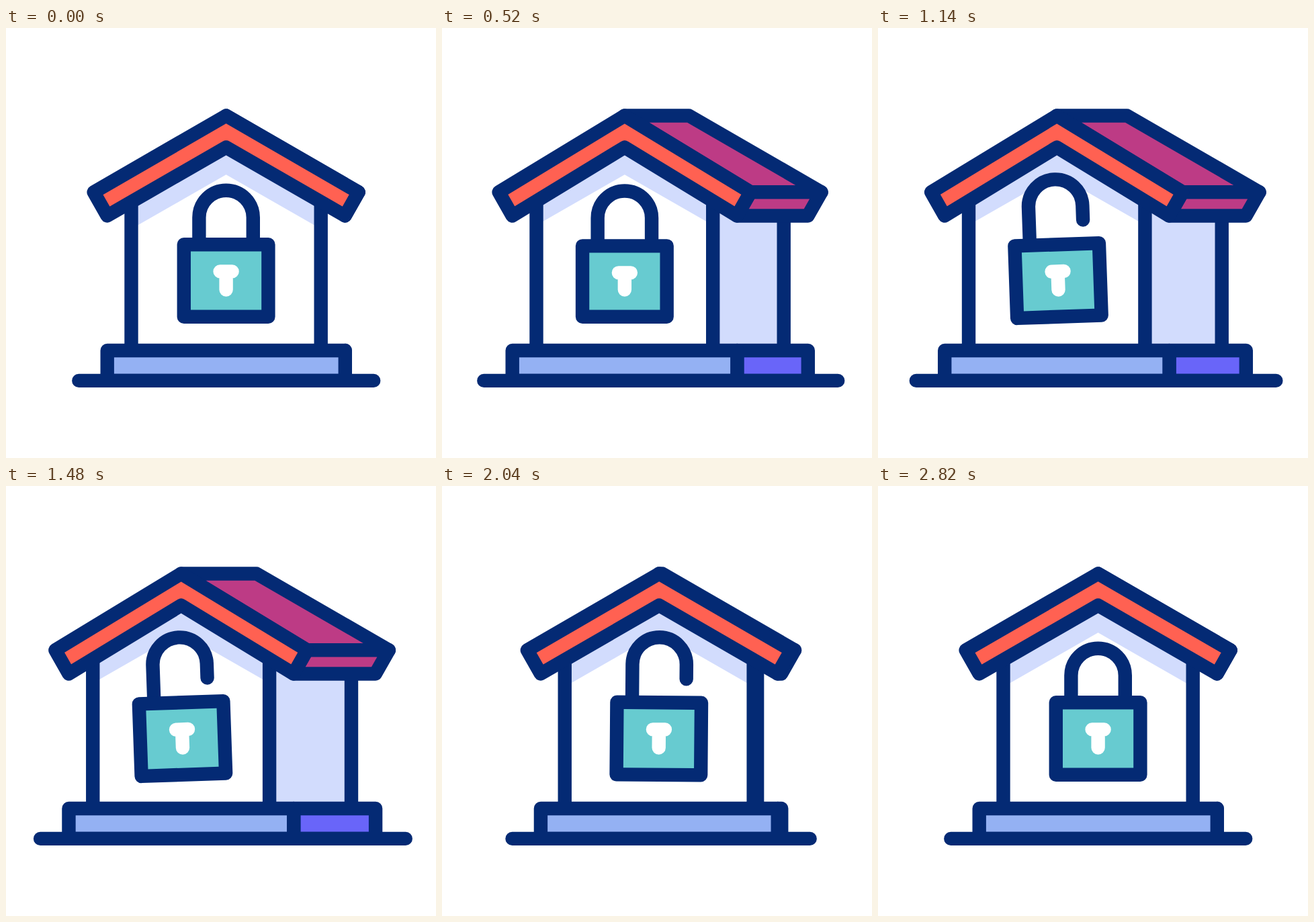
An HTML page for the animation above (3000 ms loop, 640x640 px).

```html
<!DOCTYPE html>
<html lang="en">
<head>
<meta charset="utf-8">
<title>House lock</title>
<style>
  html, body { margin: 0; width: 100%; height: 100%; overflow: hidden; background: #fff; }
  svg { display: block; width: 100%; height: 100%; }
  #scene { stroke: #042a74; stroke-width: 20.4; stroke-linejoin: round; stroke-linecap: round; fill: none; }
</style>
</head>
<body>
<svg viewBox="0 0 640 640">
  <g id="scene">
    <path id="side" fill="#d2dcfd" stroke="none"/>
    <path id="front" fill="#fff" stroke="none"/>
    <path id="shade" fill="#d2dcfd" stroke="none"/>
    <path id="walls" stroke-linecap="butt"/>
    <path id="baseSide" fill="#6965f9"/>
    <path id="base" fill="#94b1f3"/>
    <path id="ground"/>
    <path id="slope" fill="#bd3b85"/>
    <path id="eave" fill="#bd3b85"/>
    <path id="roof" fill="#ff6152"/>
    <g id="lock">
      <path id="shackle"/>
      <path id="body" fill="#67cbd0"/>
      <path id="keyhole" stroke="#fff"/>
    </g>
  </g>
</svg>
<script>
const LOOP = 3000, MID = 327.6;
const TURN = 95, PEAK = 1380;
const el = {};
document.querySelectorAll('#scene [id]').forEach(e => el[e.id] = e);

const ramp = (t, a, b) => Math.min(1, Math.max(0, (t - a) / (b - a)));
const ease = (t, a, b) => { const u = ramp(t, a, b); return u * u * (3 - 2 * u); };
const bump = (t, a, top, b) => ease(t, a, top) - ease(t, top, b);

// Turn to `rest`, drift on to `peak`, then swing back
function shift(t, rest, peak, open, close) {
  const out = rest * ease(t, TURN, open) + (peak - rest) * ramp(t, open, PEAK) ** 3;
  return out * (1 - ease(t, PEAK, close));
}

// Lean left, swing right as the house returns, then settle like a pendulum
function sway(t) {
  const swung = 1900;
  if (t < swung) return 4 * ease(t, 1480, swung) - 2 * ease(t, 540, 800);
  return 2 * Math.cos((t - swung) / 680 * 2 * Math.PI) * (1 - ramp(t, swung, 2800));
}

const poly = (...p) => 'M' + p.map(q => q[0].toFixed(2) + ' ' + q[1].toFixed(2)).join('L') + 'Z';
const line = (x1, y1, x2, y2) => `M${x1} ${y1}L${x2} ${y2}`;
const box = (x1, y1, x2, y2) => poly([x1, y1], [x2, y1], [x2, y2], [x1, y2]);
const set = (id, d) => el[id].setAttribute('d', d);

function drawHouse(l, r, b, mid) {
  const wallL = 186.5 - l, wallR = 468.7 - r, wallB = 468.7 + b;
  const ridge = [mid, 130.5], ridgeIn = [mid, 177.6], ridgeB = [MID + b, 130.5];
  const top = x => [x, 244.3], low = x => [x, 279.5];
  const topL = top(130.6 - l), topR = top(524.6 - r), topB = top(524.6 + b);
  const lowL = low(150.6 - l), lowR = low(504.6 - r), lowB = low(504.6 + b);
  const shadeY = 218.3 + 0.572 * (mid - wallL);

  set('side', box(wallR, 275, wallB, 480));
  set('front', poly([wallL, 258], ridgeIn, [wallR, 258], [wallR, 480], [wallL, 480]));
  set('shade', poly([wallL, 258], ridgeIn, [wallR, 258], [wallR, shadeY], [mid, 218.3], [wallL, shadeY]));
  set('walls', line(wallL, 262, wallL, 480) + line(wallR, 262, wallR, 480) + line(wallB, 275, wallB, 480));

  const baseR = 504.8 - r, groundY = 524.9;
  set('baseSide', box(baseR, 480, 504.8 + b, groundY));
  set('base', box(150.7 - l, 480, baseR, groundY));
  set('ground', line(108.3 - l, groundY, 547.2 + b * 1.05, groundY));

  set('slope', poly(ridge, ridgeB, topB, topR));
  set('eave', poly(topR, topB, lowB, lowR));
  set('roof', poly(lowL, topL, ridge, topR, lowR, ridgeIn));
}

function drawLock(mid, angle, up, press) {
  el.lock.setAttribute('transform', `translate(${mid} 0) rotate(${angle} 0 324)`);
  const arcY = 282 - up, legEnd = arcY + 30.6 - 0.55 * up;
  set('shackle', `M-40.2 ${322 + press}V${arcY}A40.2 40.2 0 0 1 40.2 ${arcY}V${legEnd}`);
  const bar = 362.4 + press * 0.95;
  set('body', box(-62.8, 322.3 + press, 62.8, 429.8));
  set('keyhole', line(-9, bar, 9, bar) + line(0, bar, 0, 389.6));
}

function draw(t) {
  const l = shift(t, 46, 60, 490, 2160);
  const r = shift(t, 65.5, 80.3, 490, 2160);
  const b = shift(t, 40, 48, 515, 2080);
  const mid = MID - (l + r) / 2;
  drawHouse(l, r, b, mid);

  const press = bump(t, 480, 600, 920) + bump(t, 2270, 2340, 2480);
  const lift = 16.5 * (ease(t, 600, 920) - ease(t, 2250, 2340))
    + 5.5 * bump(t, 2120, 2250, 2340) - 2.5 * press;
  drawLock(mid, sway(t), lift, 7.5 * press);
}

const start = performance.now();
function tick() {
  draw((performance.now() - start) % LOOP);
  requestAnimationFrame(tick);
}
tick();
</script>
</body>
</html>
```
